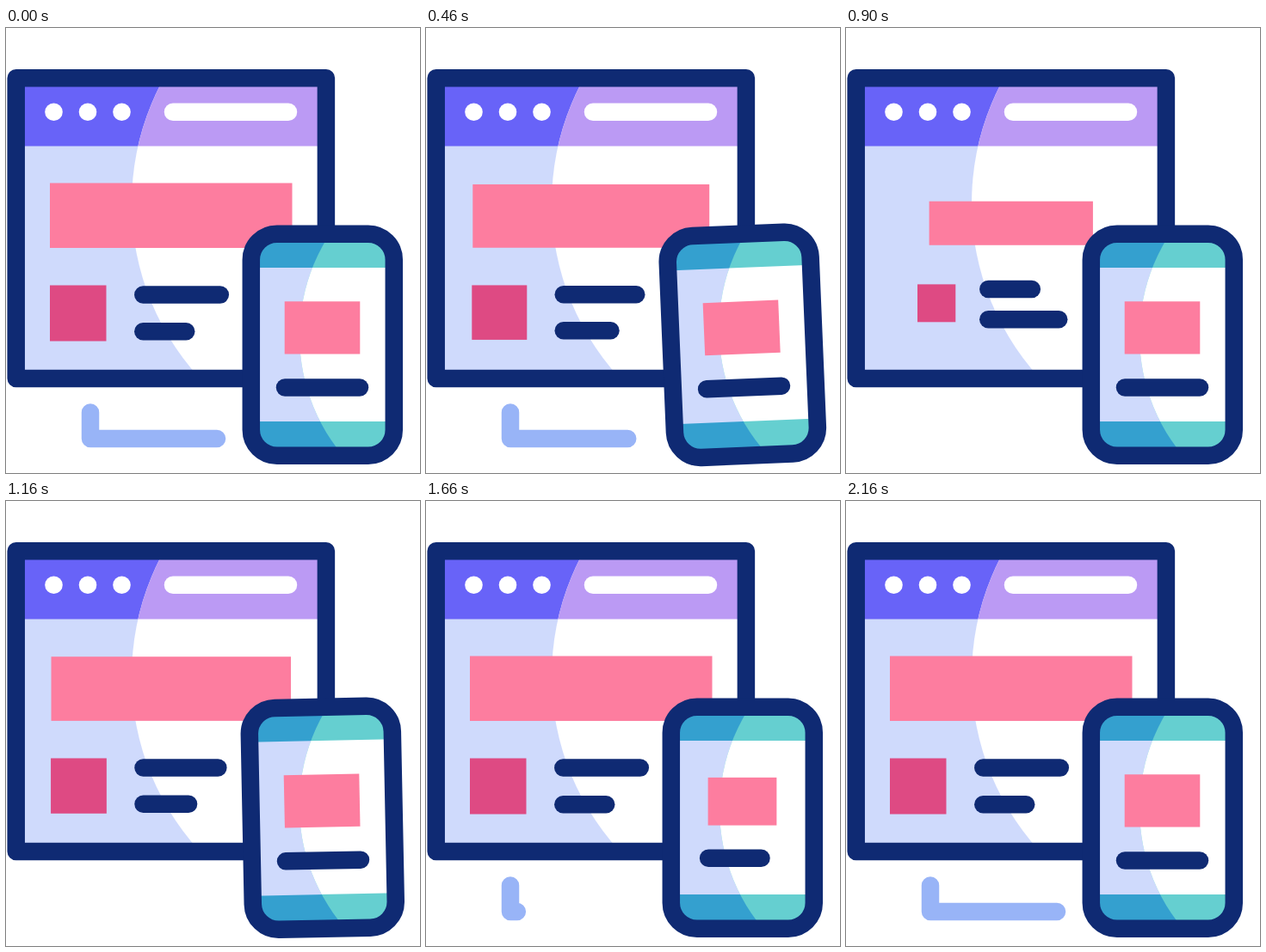
Recreate the animation shown at these times as an HTML page. Size 481 px wide and 518 px high, loop 2380 ms.

```html
<!DOCTYPE html>
<html lang="en">
<head>
<meta charset="utf-8">
<title>Responsive layout icon</title>
<style>
  html, body { margin: 0; width: 100%; height: 100%; overflow: hidden; background: #fff; }
  svg { display: block; width: 100%; height: 100%; }
  .line { fill: none; stroke: #0f2a73; stroke-width: 20.5; stroke-linecap: round; stroke-linejoin: round; }
</style>
</head>
<body>
<svg viewBox="0 0 481 518">
  <defs>
    <clipPath id="screenClip"><rect x="20" y="67" width="344" height="333"/></clipPath>
    <clipPath id="phoneClip"><rect x="285" y="240" width="166" height="258" rx="30"/></clipPath>
    <clipPath id="screenLight"><circle cx="448" cy="204" r="302"/></clipPath>
    <clipPath id="phoneLight"><circle cx="559" cy="358.5" r="218"/></clipPath>
  </defs>

  <path id="stand" class="line" d="M98 447.5V478H245" style="stroke:#98b4f7"/>

  <g id="screen">
    <g clip-path="url(#screenClip)">
      <rect x="12" y="58" width="360" height="350" fill="#cfdafc"/>
      <rect x="12" y="58" width="360" height="79.5" fill="#6863f8"/>
      <g clip-path="url(#screenLight)">
        <rect x="12" y="58" width="360" height="350" fill="#fff"/>
        <rect x="12" y="58" width="360" height="79.5" fill="#bb9af4"/>
      </g>
    </g>
    <g fill="#fff">
      <circle cx="55.5" cy="97.8" r="10.3"/>
      <circle cx="95" cy="97.8" r="10.3"/>
      <circle cx="134.5" cy="97.8" r="10.3"/>
    </g>
    <path class="line" d="M194 97.8H328" style="stroke:#fff"/>
    <rect id="banner" x="51" y="180.5" width="281.5" height="75.5" fill="#fd7d9f"/>
    <rect id="tile" x="51" y="299.5" width="65.5" height="65" fill="#de4a83"/>
    <path id="lineA" class="line"/>
    <path id="lineB" class="line"/>
    <rect class="line" x="11.7" y="58.2" width="360.2" height="349.8"/>
  </g>

  <g id="phone">
    <g clip-path="url(#phoneClip)">
      <rect x="285" y="240" width="166" height="258" fill="#34a0cf"/>
      <rect x="285" y="279" width="166" height="179" fill="#cfdafc"/>
      <g clip-path="url(#phoneLight)">
        <rect x="285" y="240" width="166" height="258" fill="#65cfd0"/>
        <rect x="285" y="279" width="166" height="179" fill="#fff"/>
      </g>
    </g>
    <rect id="card" x="323.7" y="318.3" width="87.6" height="61.2" fill="#fd7d9f"/>
    <path id="lineC" class="line"/>
    <rect class="line" x="284.8" y="239.8" width="166" height="258" rx="30"/>
  </g>
</svg>
<script>
const LOOP = 2380, STEP = 20, STAND_LENGTH = 177.5;
const el = id => document.getElementById(id);
const clamp = u => Math.min(1, Math.max(0, u));
const smooth = u => u * u * (3 - 2 * u);

// Eased value at time t between [time, value] keys.
function track(t, keys) {
  if (t <= keys[0][0]) return keys[0][1];
  for (let i = 1; i < keys.length; i++) {
    const [t0, a] = keys[i - 1], [t1, b] = keys[i];
    if (t < t1) return a + (b - a) * smooth((t - t0) / (t1 - t0));
  }
  return keys[keys.length - 1][1];
}

// Rises from 0 to 1 and falls back, linear, around a peak.
const pulse = (t, peak, half) => clamp(1 - Math.abs(t - peak) / half);
// Line ends lead the shapes slightly.
const lead = u => smooth(Math.pow(u, 0.8));

const setTransform = (id, value) => el(id).setAttribute("transform", value);
const scaleAbout = (id, x, y, s) =>
  setTransform(id, `translate(${x} ${y}) scale(${s}) translate(${-x} ${-y})`);
const setLine = (id, x0, x1, y) => el(id).setAttribute("d", `M${x0} ${y}H${x1}`);

function draw(t) {
  const u = pulse(t, 800, 400), p = smooth(u), q = lead(u);
  scaleAbout("banner", 191.8, 246, 1 - 0.384 * p);
  scaleAbout("tile", 149.8, 296, 1 - 0.384 * p);
  setLine("lineA", 159.3 + 7.1 * p, 248.8 - 37 * q, 310.6 - 7.7 * p);
  setLine("lineB", 159.3 + 7.1 * p, 209.2 + 42.7 * q, 353.3 - 16.6 * p);

  const v = pulse(t, 1800, 200), r = smooth(v);
  scaleAbout("card", 367.5, 358, 1 - 0.416 * r);
  setLine("lineC", 324 + 19 * r, 411 - 66 * lead(v), 418.5 - 12.8 * r);

  const tilt = track(t, [[400, 0], [600, -11], [800, 11], [1000, -11], [1200, 0]]);
  setTransform("phone", `rotate(${tilt} 367.8 368.8)`);

  const hop = track(t, [[1200, 0], [1360, -49], [1600, 0]]);
  setTransform("screen", `translate(0 ${hop})`);

  const shown = track(t, [[400, 1], [800, 0], [1600, 0], [1800, 1]]);
  const stand = el("stand");
  stand.style.visibility = shown > 0 ? "visible" : "hidden";
  stand.style.strokeDasharray = `${shown * STAND_LENGTH} 400`;
}

const start = performance.now();
function tick() {
  const t = (performance.now() - start) % LOOP;
  draw(Math.floor(t / STEP) * STEP);
  requestAnimationFrame(tick);
}
draw(0);
requestAnimationFrame(tick);
</script>
</body>
</html>
```
